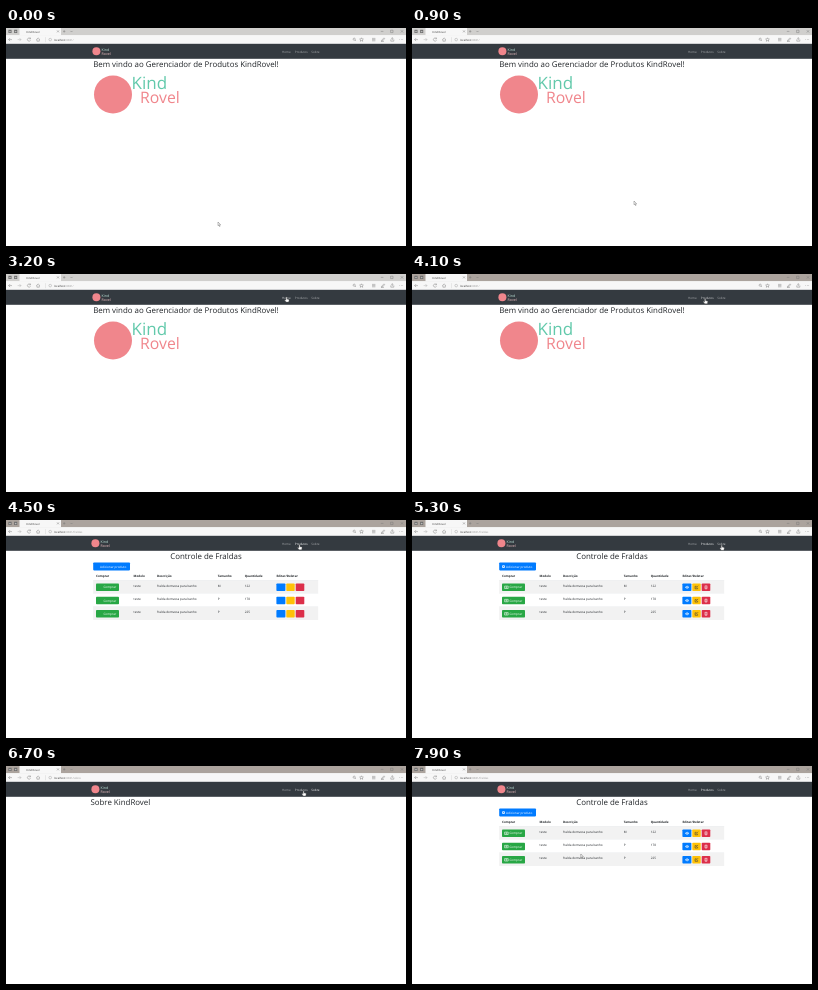
These frames come from a looping animation (400x218 px, 8000 ms). An HTML page:

```html
<!DOCTYPE html>
<html lang="pt">
<head>
<meta charset="utf-8">
<title>Kind Rovel</title>
<style>
  html, body { margin: 0; width: 100%; height: 100%; overflow: hidden; background: #fff; }
  svg { display: block; width: 100vw; height: 100vh; }
  text { font-family: "Open Sans", "Noto Sans", sans-serif; text-rendering: geometricPrecision; white-space: pre; }
  .line { fill: none; stroke: #777; stroke-width: .45; }
</style>
</head>
<body>
<svg id="stage" viewBox="0 0 400 218" preserveAspectRatio="none"></svg>
<script>
const LOOP = 8000, STEP = 100;
const BLUE = '#007bff', GREEN = '#28a745', YELLOW = '#ffc107', RED = '#dc2f4a';
const PINK = '#f0868c', MINT = '#62c9ab', INK = '#212529';

const text = (x, y, size, str, fill = INK, more = '') =>
  `<text x="${x}" y="${y}" font-size="${size}" fill="${fill}" ${more}>${str}</text>`;
const rect = (x, y, w, h, fill, r = 0) =>
  `<rect x="${x}" y="${y}" width="${w}" height="${h}" rx="${r}" fill="${fill}"/>`;
const line = (d, more = '') => `<path class="line" d="${d}" ${more}/>`;
const dot = (x, y, r, fill) => `<circle cx="${x}" cy="${y}" r="${r}" fill="${fill}"/>`;
const group = (id, body) => `<g id="${id}">${body}</g>`;

function browser() {
  return `<rect id="titlebar" width="400" height="7.4"/>`
    + rect(13.5, 0, 41.5, 7.4, '#f7f7f7') + rect(0, 7.2, 400, 8.8, '#f7f7f7')
    + rect(2.5, 1.8, 3, 3.2, '#666') + rect(8.2, 1.8, 3, 3.2, '#666')
    + rect(3.2, 2.8, 1.6, 1.5, '#bbb') + rect(8.9, 2.8, 1.6, 1.5, '#bbb')
    + text(20.3, 4.5, 2.7, 'Kind Rovel', '#333')
    + line('M51 2.4l2 2m0-2l-2 2M57 3.4h2.4m-1.2-1.2v2.4M64.4 2.9l1.1 1.1 1.1-1.1')
    + line('M374.8 3.4h2.6M384.6 2.2h2.4v2.4h-2.4zM394.8 2.2l2.4 2.4m0-2.4l-2.4 2.4')
    + line('M6 11.6H2.6m1.5-1.5l-1.5 1.5 1.5 1.5')
    + line('M11.6 11.6H15m-1.5-1.5l1.5 1.5-1.5 1.5', 'opacity=".6"')
    + line('M24.3 10.6a1.6 1.6 0 1 0 .2 1.6M24.5 9.6v1.2h-1.2')
    + line('M30.4 11.5l1.7-1.6 1.7 1.6M30.9 11.2v2h2.4v-2')
    + line('M39.5 9.2v5', 'opacity=".3"')
    + `<circle class="line" cx="44.2" cy="11.6" r="1.3" opacity=".7"/>`
    + `<text id="url" x="48" y="12.6" font-size="2.75" fill="#333">localhost<tspan id="path" fill="#999"></tspan></text>`
    + `<circle class="line" cx="348.2" cy="11.2" r="1.1"/>` + line('M349 12l1 1')
    + line('M355.5 9.8l.6 1.2 1.3.1-1 .9.3 1.3-1.2-.7-1.2.7.3-1.3-1-.9 1.3-.1z')
    + line('M366 10.4h3.4M366 11.6h3.4M366 12.8h3.4')
    + line('M375.4 13.2l.4-1.1 2.1-2.2.8.7-2.1 2.2zM375 13.4h3')
    + line('M384.8 11.4v1.8h3v-1.8M386.3 12.2V9.7m-.9.9l.9-.9.9.9')
    + [393.8, 395.3, 396.8].map(x => dot(x, 11.6, .3, '#777')).join('');
}

function navbar() {
  const brand = dot(90.4, 23.3, 4, PINK)
    + text(95.6, 22.8, 3.6, 'Kind', '#bfe6da') + text(95.6, 26.5, 3.6, 'Rovel', '#f4c3c5');
  const links = [[276, 'Home'], [288.8, 'Produtos'], [305.3, 'Sobre']]
    .map(([x, s]) => text(x, 24.6, 3.05, s, '#fff', 'class="link"')).join('');
  return rect(0, 15.8, 400, 15, '#343a40') + group('brand', brand) + links;
}

function home() {
  return text(87.2, 39.2, 7.9, 'Bem vindo ao Gerenciador de Produtos KindRovel!')
    + dot(107, 66.5, 19, PINK)
    + text(125.5, 61, 17, 'Kind', MINT) + text(134, 74.8, 15.8, 'Rovel', PINK);
}

function row([size, count], i) {
  const y = 60.2 + i * 13.25, base = y + 6.7, top = y + 3.3, mid = top + 3.8;
  const cells = [[127.6, 'teste'], [151, 'fralda domvesa para banho'], [211.8, size], [238.7, count]];
  const icons =
    `<g class="icons" fill="none" stroke="#fff" stroke-width=".55">`
    + `<path d="M92.6 ${mid - 1.2}h3.6v2.4h-3.6z"/><circle cx="94.4" cy="${mid}" r=".5"/>`
    + `<path d="M273.2 ${mid}q1.9-2.4 3.8 0q-1.9 2.4-3.8 0z"/><circle cx="275.1" cy="${mid}" r=".5"/>`
    + `<g stroke="#343a40"><path d="M284.6 ${mid - 1}h-1.5v2.5h2.5v-1.1M284 ${mid + .5}l2.1-2.1"/></g>`
    + `<path d="M292.5 ${mid - 1.1}h3m-2-.5h1M292.9 ${mid - .5}l.2 2h1.8l.2-2M294 ${mid - .4}v1.6"/></g>`;
  return rect(87.2, y, 225, 13.25, i % 2 ? '#fff' : '#f2f2f2')
    + rect(87.2, y, 225, .25, '#dee2e6')
    + rect(90, top, 23, 7.6, GREEN, .8) + text(97.4, top + 4.9, 3.1, 'Comprar', '#fff')
    + cells.map(([x, s]) => text(x, base, 3.1, s)).join('')
    + rect(270.4, top, 9, 7.6, BLUE, .8) + rect(280.3, top, 8.4, 7.6, YELLOW, .8)
    + rect(289.7, top, 8.6, 7.6, RED, .8) + icons;
}

function products() {
  const heads = [[90, 'Comprar'], [127.6, 'Modelo'], [151, 'Descrição'], [211.8, 'Tamanho'],
    [238.7, 'Quantidade'], [270.4, 'Editar/Deletar']];
  return text(200, 39.2, 7.9, 'Controle de Fraldas', INK, 'text-anchor="middle"')
    + rect(87.2, 42.4, 36.8, 8, BLUE, .8)
    + text(94, 47.5, 3.12, 'Adicionar produto', '#fff')
    + `<g class="icons">${dot(91.5, 46.4, 1.5, '#fff')}<path d="M90.6 46.4h1.8m-.9-.9v1.8" stroke="${BLUE}" stroke-width=".5"/></g>`
    + heads.map(([x, s]) => text(x, 56.9, 3.02, s, INK, 'font-weight="700"')).join('')
    + [['M', 122], ['P', 178], ['P', 225]].map(row).join('');
}

const about = () => text(84.4, 39.2, 7.9, 'Sobre KindRovel');

const pointer = `<g id="pointer" stroke="#555" stroke-width=".4" stroke-linejoin="round" fill="#fff">
  <path id="arrow" d="M0 0v3.7l.8-.7.7 1.5.6-.3-.7-1.5h1.2z"/>
  <path id="hand" d="M-.5 0q.5-.5 1 0v1.7l1.7.4q.5.2.4.8l-.5 1.9h-2.4l-1.5-1.9q0-.7.6-.5l.7.5z"/></g>`;

const $ = id => document.getElementById(id);
$('stage').innerHTML = rect(0, 0, 400, 218, '#fff') + browser() + navbar()
  + group('home', home()) + group('products', products()) + group('about', about()) + pointer;

// start time, page, whether the icon font is ready
const VISITS = [[0, 'home', true], [4300, 'products', false], [4700, 'products', true],
  [5700, 'about', true], [7200, 'products', false], [7400, 'products', true]];
const PATHS = { home: ':8081/', products: ':8081/fraldas', about: ':8081/sobre' };

// the window gains focus and its title bar darkens
const FOCUS = 3800;

// time, x, y of the pointer tip
const MOVES = [[0, 212, 194], [300, 212.5, 193], [900, 222, 173], [1100, 226, 168.5], [1200, 226, 168.5],
  [1700, 278.3, 76.8], [2200, 279, 76], [2900, 280.5, 26], [3100, 280.5, 23.3], [3300, 280.5, 23.3],
  [3900, 293, 25], [4800, 293.7, 25], [5200, 309.7, 25.4], [6100, 309.7, 25.4], [6400, 300, 25.4],
  [6600, 297.6, 25.2], [7200, 297.6, 25.2], [7800, 170, 87], [7900, 168.8, 88], [8000, 168.8, 88]];

function tipAt(t) {
  const i = Math.max(1, MOVES.findIndex(m => m[0] > t));
  const [t0, x0, y0] = MOVES[i - 1], [t1, x1, y1] = MOVES[i];
  const k = (t - t0) / (t1 - t0);
  return [x0 + (x1 - x0) * k, y0 + (y1 - y0) * k];
}

const links = [...document.querySelectorAll('.link')];
const icons = [...document.querySelectorAll('.icons')];
const show = (el, on) => { el.style.display = on ? '' : 'none'; };

function draw(t) {
  const [, page, ready] = VISITS.filter(v => v[0] <= t).pop();
  const [x, y] = tipAt(t);
  const overNav = y < 28 && x > 274 && x < 317;
  const hovered = overNav ? (x < 287 ? 0 : x < 303.5 ? 1 : 2) : -1;
  const active = { home: -1, products: 1, about: 2 }[page];

  for (const id in PATHS) show($(id), id === page);
  icons.forEach(el => show(el, ready));
  links.forEach((el, i) => el.setAttribute('fill-opacity', i === active ? 1 : i === hovered ? .8 : .58));
  $('path').textContent = PATHS[page];
  $('titlebar').setAttribute('fill', t < FOCUS ? '#d0cfcd' : '#aba39d');
  $('brand').setAttribute('transform', `translate(${page === 'home' ? 0 : -1} 0)`);
  $('pointer').setAttribute('transform', `translate(${x} ${y})`);
  show($('arrow'), !overNav);
  show($('hand'), overNav);
}

const start = performance.now();
function tick() {
  const t = (performance.now() - start) % LOOP;
  draw(Math.floor(t / STEP) * STEP);
  requestAnimationFrame(tick);
}
tick();
</script>
</body>
</html>
```
